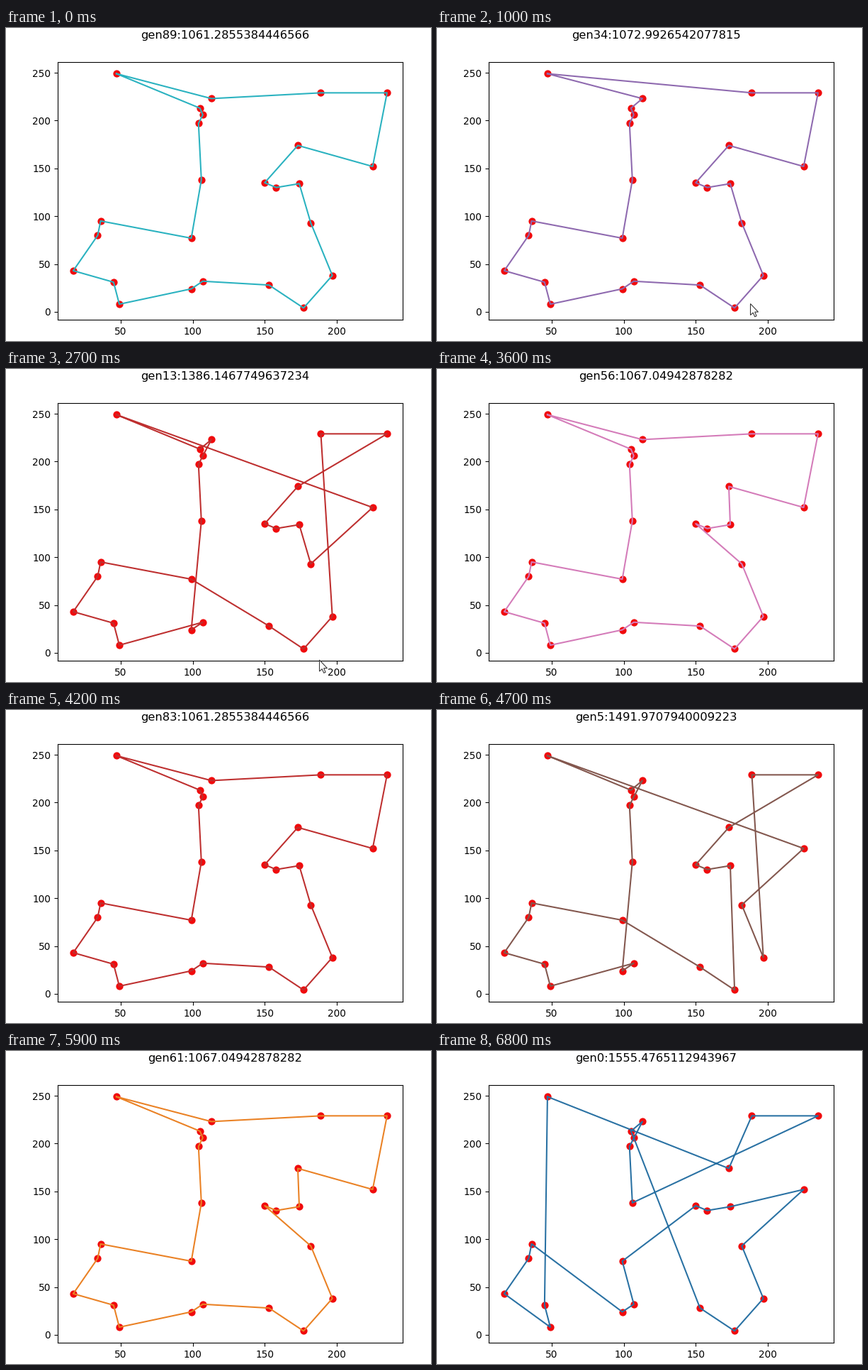
These frames come from a looping animation (600x441 px, 6.9 s). A matplotlib script:

```python
import colorsys
import numpy as np
import matplotlib.pyplot as plt
from matplotlib.animation import FuncAnimation
from matplotlib.colors import to_rgb
from matplotlib.patches import Polygon

W, H, DPI = 600, 441, 96
PT = 98.3 / DPI  # the plot is drawn slightly larger than its dpi suggests
FRAMES = 69
LEFT, TOP, WIDTH, HEIGHT = 72.8, 47.9, 487.3, 363.1

# cities in the order of the shortest round trip
CITIES = np.array([
    (47, 249), (113, 223), (189, 229), (235, 229), (225, 152),
    (173, 174), (150, 135), (158, 130), (174, 134), (182, 93),
    (197, 38), (177, 4), (153, 28), (107, 32), (99, 24),
    (49, 8), (45, 31), (17, 43), (34, 80), (36, 95),
    (99, 77), (106, 138), (104, 197), (107, 206), (105, 213)], float)
NAMES = "ABCDEFGHIJKLMNOPQRSTUVWXY"
BEST = NAMES


def path(tour):
    return CITIES[[NAMES.index(c) for c in tour + tour[0]]]


def length(tour):
    total = 0.0
    for dx, dy in np.diff(path(tour), axis=0):
        total += float(np.hypot(dx, dy))
    short = round(total, 11)
    return short if abs(short - total) < 5e-13 else total  # trim float noise


def improve(tour):
    """Reverse the one stretch that shortens the tour most."""
    n = len(tour)
    trials = [tour[:i] + tour[i:j][::-1] + tour[j:]
              for i in range(1, n) for j in range(i + 2, n + 1)]
    return min(trials, key=length)


# (first generation, tour)
stages = [(0, "AQPRSTONUGHIEJKLMXYBWVDCF"), (3, "AYBXWVONPQRSTUMLIHGFDCKJE")]
for start in range(9, 30, 6):
    stages.append((start, improve(stages[-1][1])))
stages += [(30, BEST[0] + BEST[2:] + BEST[1]),
           (45, BEST[:6] + BEST[8:5:-1] + BEST[9:]),
           (67, BEST)]
STAGES = [(start, path(t), str(length(t))) for start, t in stages]


def generation(i):
    total = np.interp(i, [0, 10, 19, 36, 47, 59, 68],
                      [89, 134, 174, 256, 305, 361, 400])
    return int(round(total)) % 100


def muted(color):
    """The recorded screen shows the cycle colours a little paler."""
    y, i, q = colorsys.rgb_to_yiq(*to_rgb(color))
    return np.clip(colorsys.yiq_to_rgb(y * 0.98, i * 0.82, q * 0.82), 0, 1)


fig = plt.figure(figsize=(W / DPI, H / DPI), dpi=DPI, facecolor="white")
ax = fig.add_axes([LEFT / W, 1 - (TOP + HEIGHT) / H, WIDTH / W, HEIGHT / H])
lo, hi = CITIES.min(axis=0), CITIES.max(axis=0)
margin = 0.05 * (hi - lo)
ax.set_xlim(lo[0] - margin[0], hi[0] + margin[0])
ax.set_ylim(lo[1] - margin[1], hi[1] + margin[1])
ax.set_xticks(range(50, 201, 50))
ax.set_yticks(range(0, 251, 50))
ax.tick_params(labelsize=10 * PT, length=3.5 * PT, pad=3.5 * PT, width=0.8 * PT)
for spine in ax.spines.values():
    spine.set_linewidth(0.8 * PT)

ax.scatter(*CITIES.T, s=36 * PT**2, c="#f00a0c", linewidths=1.5 * PT, zorder=1)
route, = ax.plot([], [], lw=1.5 * PT, zorder=2)
title = fig.text((LEFT + 236.5) / W, 1 - 2.8 / H, "", fontsize=12 * PT,
                 ha="center", va="top")

# mouse pointer on a pixel-sized overlay
screen = fig.add_axes([0, 0, 1, 1])
screen.set_xlim(0, W)
screen.set_ylim(H, 0)
screen.axis("off")
ARROW = np.array([(0, 0), (0, 16), (3.7, 12.6), (6.2, 18.3),
                  (8.6, 17.2), (6.2, 11.6), (11, 11.6)])
pointer = Polygon(ARROW, fc="white", ec="#333333", lw=0.8)
screen.add_patch(pointer)


def draw(i):
    gen = generation(i)
    _, pts, dist = [s for s in STAGES if s[0] <= gen][-1]
    route.set_data(*pts.T)
    route.set_color(muted(f"C{gen % 10}"))
    title.set_text(f"gen{gen}:{dist}")
    pointer.set_visible(4 <= i < 31)
    pointer.set_xy(ARROW + (442.5, np.interp(i, [24, 26, 28], [388.5, 413, 407])))
    return route, title, pointer


anim = FuncAnimation(fig, draw, frames=FRAMES, interval=100,
                     repeat=True, repeat_delay=0, blit=False)
plt.show()
```
